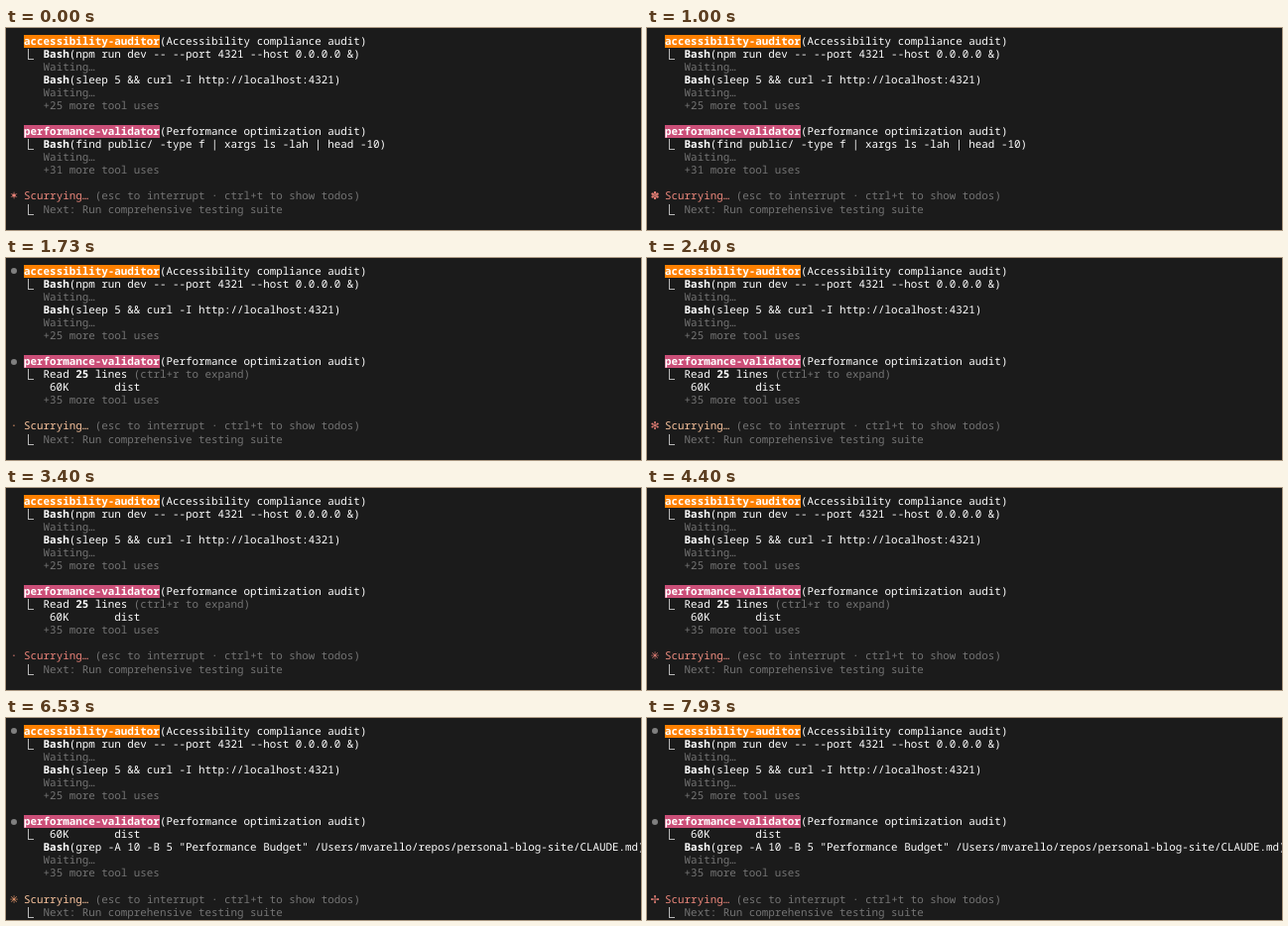
An HTML page for the animation above (8000 ms loop, 640 px wide and 204 px high).

```html
<!DOCTYPE html>
<html lang="en">
<head>
<meta charset="utf-8">
<title>Terminal audit</title>
<style>
  html, body { margin: 0; width: 100%; height: 100%; overflow: hidden; background: #1b1b1b; }
  #screen {
    position: relative; width: 640px; height: 204px; overflow: hidden;
    color: #fff; background: #1b1b1b;
    font: 500 10.87px/13.04px "Noto Sans Mono", "DejaVu Sans Mono", monospace;
    text-rendering: geometricPrecision; font-variant-ligatures: none;
  }
  .row { position: absolute; left: 5px; height: 13.04px; white-space: pre; }
  .row b { font-weight: 700; }
  .row i { font-style: normal; color: #747474; }
  .badge { display: inline-block; font-weight: 700; }
  .bullet {
    position: absolute; left: 0; top: 3.4px; width: 6px; height: 6px;
    border-radius: 50%; background: #808080; opacity: var(--bullet);
  }
  .elbow {
    position: absolute; left: 17px; top: 1px; width: 5px; height: 10px;
    border: solid #b8b8b8; border-width: 0 0 1px 1px;
  }
  .star {
    position: absolute; left: 3px; top: 0; transform: translateX(-50%);
    color: var(--star); font-family: "DejaVu Sans", sans-serif; font-weight: 400;
  }
  .verb { color: var(--verb); }
</style>
</head>
<body>
<div id="screen"></div>
<script>
const LOOP = 8000, ROW = 13.04, TOP = 7;
const BLINK = 600, BLINK_START = 165;
const SPIN_STEP = 122, SPIN_START = 5;
const SPINNER = [..."✳✢··✢✳✶✻✽✽✻✶"];
const ORANGE = [240, 158, 112], SALMON = [237, 132, 122], PEACH = [250, 196, 158];

const dim = s => `<i>${s}</i>`;
const bash = s => `<b>Bash</b>(${s})`;
const indent = s => "     " + s;
const elbow = s => `<span class="elbow"></span>` + indent(s);
const agent = (name, color, task) =>
  `<span class="bullet"></span>  <span class="badge" style="background:${color}">${name}</span>(${task})`;
const file = (size, time, name) =>
  `-rw-r--r--  1 mvarello  staff   ${size} Sep  9 ${time} public/${name}`;

const waiting = dim("Waiting…");
const read = `Read <b>25</b> lines ${dim("(ctrl+r to expand)")}`;
const dist = " 60K       dist";

// Each scene lists the second agent's output and its count of hidden tool uses.
const scenes = [
  { at: 0, uses: 31, output: [bash("find public/ -type f | xargs ls -lah | head -10)".slice(0, -1)), waiting] },
  { at: 1165, uses: 34, output: [
    file("204B", "19:25", "favicon.svg"),
    file("797B", "20:30", "robots.txt"),
    file("4.4K", "20:31", "rss-styles.xsl"),
    read] },
  { at: 1565, uses: 35, output: [read, dist] },
  { at: 6330, uses: 35, output: [
    dist,
    bash('grep -A 10 -B 5 "Performance Budget" /Users/mvarello/repos/personal-blog-site/CLAUDE.md'),
    waiting] },
];

function sceneRows({ uses, output }) {
  return [
    agent("accessibility-auditor", "#ff8000", "Accessibility compliance audit"),
    elbow(bash("npm run dev -- --port 4321 --host 0.0.0.0 &amp;")),
    indent(waiting),
    indent(bash("sleep 5 &amp;&amp; curl -I http://localhost:4321")),
    indent(waiting),
    indent(dim("+25 more tool uses")),
    "",
    agent("performance-validator", "#cb4f78", "Performance optimization audit"),
    ...output.map((line, i) => (i ? indent : elbow)(line)),
    indent(dim(`+${uses} more tool uses`)),
    "",
    `<span class="star"></span>  <span class="verb">Scurrying…</span> ` +
      dim("(esc to interrupt · ctrl+t to show todos)"),
    elbow(dim("Next: Run comprehensive testing suite")),
  ];
}

const screenEl = document.getElementById("screen");
const clamp = x => Math.min(1, Math.max(0, x));
const mix = (a, b, k) => a.map((v, i) => v + (b[i] - v) * k);
const rgb = c => `rgb(${c.map(Math.round)})`;
let shown, star;

function show(scene) {
  shown = scene;
  screenEl.innerHTML = sceneRows(scene)
    .map((html, i) => `<div class="row" style="top:${TOP + i * ROW}px">${html}</div>`)
    .join("");
  star = screenEl.querySelector(".star");
}

function draw(now) {
  const t = now % LOOP;
  const scene = scenes.filter(s => s.at <= t).pop();
  if (scene !== shown) show(scene);

  const step = Math.floor((t - SPIN_START) / SPIN_STEP);
  star.textContent = SPINNER[(step + 12) % 12];

  // The spinner cools to salmon when no output has arrived for a while.
  const age = scene.at ? t - scene.at : LOOP;
  const pulse = 0.08 * (1 + Math.sin(t / 1000 * Math.PI));
  const fresh = mix(PEACH, SALMON, clamp((age - 850) / 650));
  const blinkOn = Math.floor((t - BLINK_START) / BLINK) % 2 === 0;
  screenEl.style.setProperty("--star", rgb(mix(ORANGE, SALMON, clamp((age - 300) / 500))));
  screenEl.style.setProperty("--verb", rgb(mix(fresh, PEACH, pulse)));
  screenEl.style.setProperty("--bullet", t >= BLINK_START && blinkOn ? 1 : 0);
}

function frame() {
  draw(performance.now());
  requestAnimationFrame(frame);
}
frame();
</script>
</body>
</html>
```
